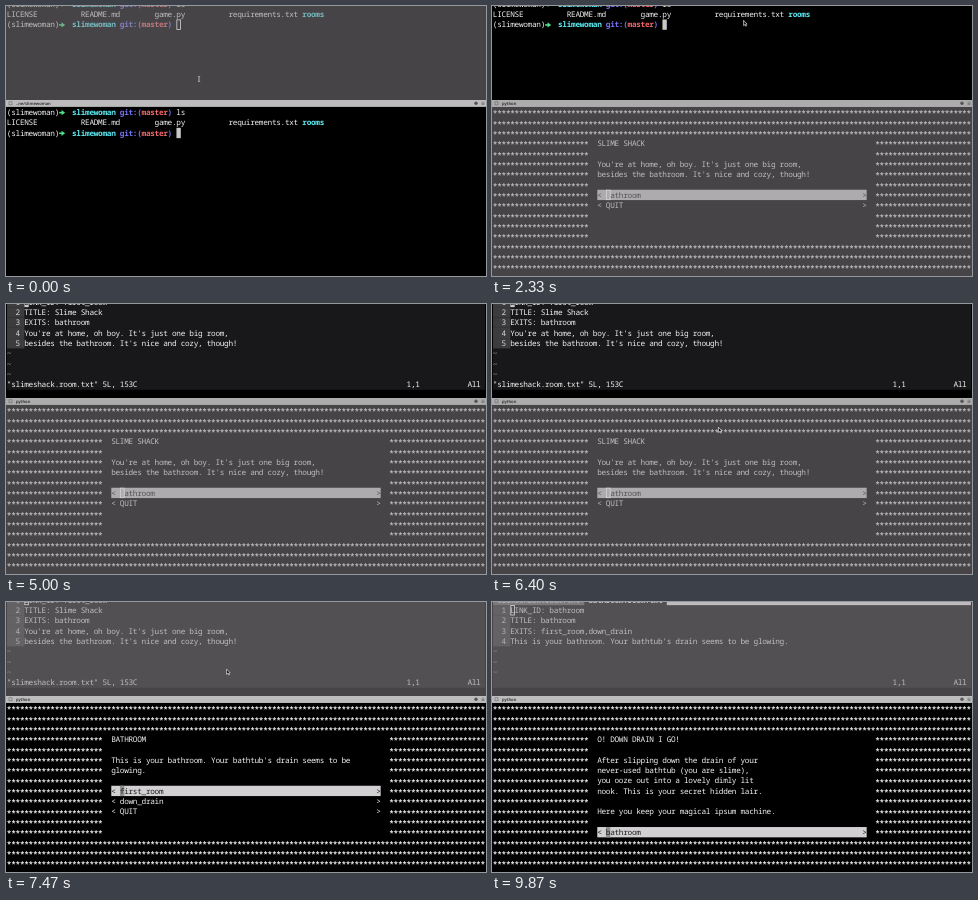
An HTML page with a canvas for the animation above (9.99 s loop, 480 by 270 pixels).

```html
<!DOCTYPE html>
<html lang="en">
<head>
<meta charset="utf-8">
<title>Text adventure in a split terminal</title>
<style>
html, body { margin: 0; width: 100%; height: 100%; overflow: hidden; background: #000; }
canvas { display: block; width: 100vw; height: 100vh; }
</style>
</head>
<body>
<canvas id="stage"></canvas>
<script>
const W = 480, H = 270, LOOP = 9990, TICK = 1000 / 15;
const CELL = 4.345, ROW = 10.32, LEFT = 1;
const TOP = 8.3, BOTTOM = 106.35, BAR = 94, BAR_END = 100.7;
const SIZE = 7.75;
const FONT = SIZE + 'px "Noto Sans Mono", "DejaVu Sans Mono", monospace';
const INK = '#f2f2f2', CYAN = '#5ce8f0', GREEN = '#4fe08a', BLUE = '#7474f4', RED = '#f0686c';
const canvas = document.getElementById('stage');
const ctx = canvas.getContext('2d');

const colX = col => LEFT + col * CELL;

// Last value whose time has come.
function at(t, list) {
  let value = list[0][1];
  for (const [time, v] of list) if (t >= time) value = v;
  return value;
}

function typed(t, start, end, text) {
  if (t < start) return '';
  const n = 1 + Math.floor((t - start) / (end - start) * (text.length - 1) + 0.01);
  return text.slice(0, n);
}

// Glyphs are slightly larger than the cell pitch, so tracking is negative.
function put(text, col, y, color = INK, weight = 500) {
  ctx.font = weight + ' ' + FONT;
  ctx.letterSpacing = CELL - 0.6 * SIZE + 'px';
  ctx.fillStyle = color;
  ctx.fillText(text, colX(col) + (CELL - 0.6 * SIZE) / 2, y + 2.7);
  ctx.letterSpacing = '0px';
}

function box(x, y, w, h, color) {
  ctx.fillStyle = color;
  ctx.fillRect(x, y, w, h);
}

function shape(points, color) {
  ctx.beginPath();
  for (const [x, y] of points) ctx.lineTo(x, y);
  ctx.closePath();
  ctx.fillStyle = color;
  ctx.fill();
}

function cells(col, y, count, color) {
  box(colX(col), y - ROW / 2, count * CELL, ROW, color);
}

// Hollow cursors are drawn over the dimmed pane.
let hollow = null;
function cursor(col, y, active, color = '#c8c8c8') {
  if (active) cells(col, y, 1, color);
  else hollow = [colX(col) + 0.4, y - ROW / 2 + 0.4];
}

function arrow(col, y) {
  const x = colX(col);
  box(x, y - 0.5, 3.5, 1.6, GREEN);
  shape([[x + 2.4, y - 2.3], [x + 6, y + 0.3], [x + 2.4, y + 2.9]], GREEN);
}

function prompt(y, dir, command = '') {
  let col = 15;
  put('(slimewoman)', 0, y);
  arrow(12, y);
  put(dir, col, y, CYAN, 700);
  col += dir.length + 1;
  put('git:(', col, y, BLUE, 700);
  put('master', col + 5, y, RED, 700);
  put(')', col + 11, y, BLUE, 700);
  put(command, col + 13, y);
  return col + 13 + command.length;
}

function listing(y) {
  put('LICENSE', 0, y);
  put('README.md', 17, y);
  put('game.py', 34, y);
  put('requirements.txt', 51, y);
  put('rooms', 68, y, CYAN, 700);
}

function shell(y, command, active) {
  prompt(y, 'slimewoman', 'ls');
  listing(y + ROW);
  const end = prompt(y + 2 * ROW, 'slimewoman', command);
  if (active !== null) cursor(end, y + 2 * ROW, active);
}

const FILES = {
  shack: {
    first: -1,
    lines: ['LINK_ID: first_room', 'TITLE: Slime Shack', 'EXITS: bathroom',
      "You're at home, oh boy. It's just one big room,",
      "besides the bathroom. It's nice and cozy, though!"]
  },
  bath: {
    first: 0,
    lines: ['LINK_ID: bathroom', 'TITLE: bathroom', 'EXITS: first_room,down_drain',
      "This is your bathroom. Your bathtub's drain seems to be glowing."]
  }
};

function editor(file, command, active) {
  box(1, 0, 478, 85.8, '#18181a');
  const { first, lines } = file;
  if (first === 0) {
    const y = TOP - ROW;
    cells(0, y, 21, '#6c6c6c');
    put('slimeshack.room.txt', 1, y);
    put('bathroom.room.txt', 22, y, INK, 700);
    cells(40, y, 70, '#f0f0f0');
  }
  for (let row = first; row < 7; row++) {
    const y = TOP + row * ROW, i = row - first;
    if (i < lines.length) {
      cells(0, y, 4, '#3c3c3e');
      put(String(i + 1), 2, y, '#d8d8d8');
      if (i === 0) cursor(4, y, active && !command);
      const skip = i === 0 ? 1 : 0;
      put(lines[i].slice(skip), 4 + skip, y);
      if (skip) put(lines[i][0], 4, y, active && !command ? '#222' : INK);
    } else {
      put('~', 0, y, '#9c9ca6');
    }
  }
  const y = TOP + 7 * ROW;
  if (command) {
    put(command, 0, y);
    cursor(command.length, y, active);
    return;
  }
  if (first < 0) put('"slimeshack.room.txt" 5L, 153C', 0, y);
  put('1,1', 92, y);
  put('All', 106, y);
}

const ROOMS = {
  shack: {
    text: ['SLIME SHACK', '', "You're at home, oh boy. It's just one big room,",
      "besides the bathroom. It's nice and cozy, though!"],
    exits: ['bathroom', 'QUIT']
  },
  bath: {
    text: ['BATHROOM', '', "This is your bathroom. Your bathtub's drain seems to be",
      'glowing.'],
    exits: ['first_room', 'down_drain', 'QUIT']
  },
  drain: {
    text: ['O! DOWN DRAIN I GO!', '', 'After slipping down the drain of your',
      'never-used bathtub (you are slime),', 'you ooze out into a lovely dimly lit',
      'nook. This is your secret hidden lair.', '', 'Here you keep your magical ipsum machine.'],
    exits: ['bathroom']
  }
};

function stars() {
  for (let row = 0; row < 16; row++) {
    const y = BOTTOM + row * ROW + 1.4;
    if (row < 3 || row > 12) put('*'.repeat(110), 0, y, INK, 700);
    else for (const col of [0, 88]) put('*'.repeat(22), col, y, INK, 700);
  }
}

function game(room, chosen, active) {
  stars();
  room.text.forEach((line, i) => put(line, 24, BOTTOM + (3 + i) * ROW));
  room.exits.forEach((exit, i) => {
    const y = BOTTOM + (4 + room.text.length + i) * ROW;
    const on = i === chosen, ink = on ? '#1c1c1c' : INK;
    if (on) {
      cells(24, y, 62, '#d2d0d2');
      cursor(26, y, active, '#909090');
    }
    put('<', 24, y, ink);
    put(exit.slice(1), 27, y, ink);
    if (!on || active) put(exit[0], 26, y, ink);
    put('>', 85, y, ink);
  });
}

function pane(y, h, active, paint) {
  hollow = null;
  ctx.save();
  ctx.beginPath();
  ctx.rect(0, y, W, h);
  ctx.clip();
  box(0, y, W, h, '#000');
  paint();
  if (!active) {
    box(0, y, W, h, 'rgba(140,136,140,0.5)');
    if (hollow) {
      ctx.strokeStyle = '#d4d4d4';
      ctx.lineWidth = 0.8;
      ctx.strokeRect(...hollow, CELL - 0.6, ROW - 0.8);
    }
  }
  ctx.restore();
}

function divider(title, lit) {
  box(0, BAR, W, BAR_END - BAR, lit ? '#bcbcbc' : '#acacac');
  ctx.strokeStyle = '#6a6a6a';
  ctx.lineWidth = 0.6;
  ctx.strokeRect(3, 95.8, 3, 3);
  ctx.font = '600 4.2px "Open Sans", sans-serif';
  ctx.fillStyle = '#222';
  ctx.fillText(title, 10, 98.9);
  ctx.fillStyle = '#555';
  ctx.beginPath();
  ctx.arc(470, 97.3, 1.7, 0, 7);
  ctx.fill();
  for (let i = 0; i < 3; i++) box(475.5, 95.8 + i * 1.3, 3, 0.6, '#666');
}

const PATH = [[0, 193, 73], [70, 193, 73], [800, 209, 60], [1470, 209, 60], [1730, 253, 17],
  [5200, 253, 21], [5530, 272, 82], [5930, 272, 82], [6540, 221, 133], [7200, 221, 133],
  [7470, 222, 70], [8670, 222, 70], [9000, 194, 144]];
const SHOWN = [[0, 1], [2600, 0], [5270, 1], [7070, 0], [7270, 1], [7730, 0], [8730, 1], [9470, 0]];
const POINTER = [[-1.4, -3], [-1.4, 2.3], [-0.2, 1.3], [0.7, 3], [1.4, 2.6], [0.6, 1], [2.1, 0.8]];

function pointer(t) {
  if (!at(t, SHOWN)) return;
  let [, x, y] = PATH[PATH.length - 1];
  const i = PATH.findIndex(p => p[0] > t);
  if (i > 0) {
    const [t0, x0, y0] = PATH[i - 1], [t1, x1, y1] = PATH[i];
    const k = (t - t0) / (t1 - t0), e = k * k * (3 - 2 * k);
    x = x0 + (x1 - x0) * e;
    y = y0 + (y1 - y0) * e;
  }
  if (t < 1530 || t >= 8730) {
    box(x - 0.4, y - 2.6, 0.8, 5.2, '#d0d0d0');
    for (const end of [-3, 2.4]) box(x - 1.2, y + end, 2.4, 0.6, '#c0c0c0');
    return;
  }
  shape(POINTER.map(([dx, dy]) => [x + dx, y + dy]), '#111');
  ctx.strokeStyle = '#e4e4e4';
  ctx.lineWidth = 0.7;
  ctx.stroke();
}

function topPane(t, active) {
  if (t >= 4930) {
    const command = t < 8400 ? t < 8130 ? typed(t, 7730, 8060, ':tabe b') : ':tabe bathroom.room.txt' : '';
    editor(t < 8400 ? FILES.shack : FILES.bath, command, active);
    return;
  }
  const cd = typed(t, 2600, 2860, 'cd ') + typed(t, 3070, 3330, 'rooms');
  const entered = t >= 3470;
  shell(TOP - ROW, cd, entered ? null : active);
  if (entered) {
    const vim = t < 4670
      ? typed(t, 3730, 4000, 'vim ') + typed(t, 4470, 4530, 'sl')
      : 'vim slimeshack.room.txt ';
    const y = TOP + 2 * ROW;
    cursor(prompt(y, 'rooms', vim), y, active);
  }
}

function bottomPane(t, active) {
  if (t < 1270) {
    shell(BOTTOM, t < 1000 ? typed(t, 130, 800, 'python g') : 'python game.py ', active);
    return;
  }
  const room = at(t, [[0, 'shack'], [7070, 'bath'], [9800, 'drain']]);
  game(ROOMS[room], t >= 9470 && t < 9800 ? 1 : 0, active);
}

function draw(t) {
  const lower = at(t, [[0, true], [2330, false], [6600, true], [7470, false], [9130, true]]);
  pane(0, BAR, !lower, () => topPane(t, !lower));
  pane(BAR_END, H - BAR_END, lower, () => bottomPane(t, lower));
  divider(t < 1270 ? '..ne/slimewoman' : 'python', lower);
  pointer(t);
}

function resize() {
  const ratio = window.devicePixelRatio || 1;
  canvas.width = Math.round(innerWidth * ratio);
  canvas.height = Math.round(innerHeight * ratio);
}

const begin = performance.now();
function frame() {
  const t = (performance.now() - begin) % LOOP;
  ctx.setTransform(canvas.width / W, 0, 0, canvas.height / H, 0, 0);
  ctx.textRendering = 'geometricPrecision';
  draw(Math.floor((t + 4) / TICK) * TICK);
  requestAnimationFrame(frame);
}
addEventListener('resize', resize);
resize();
frame();
</script>
</body>
</html>
```
